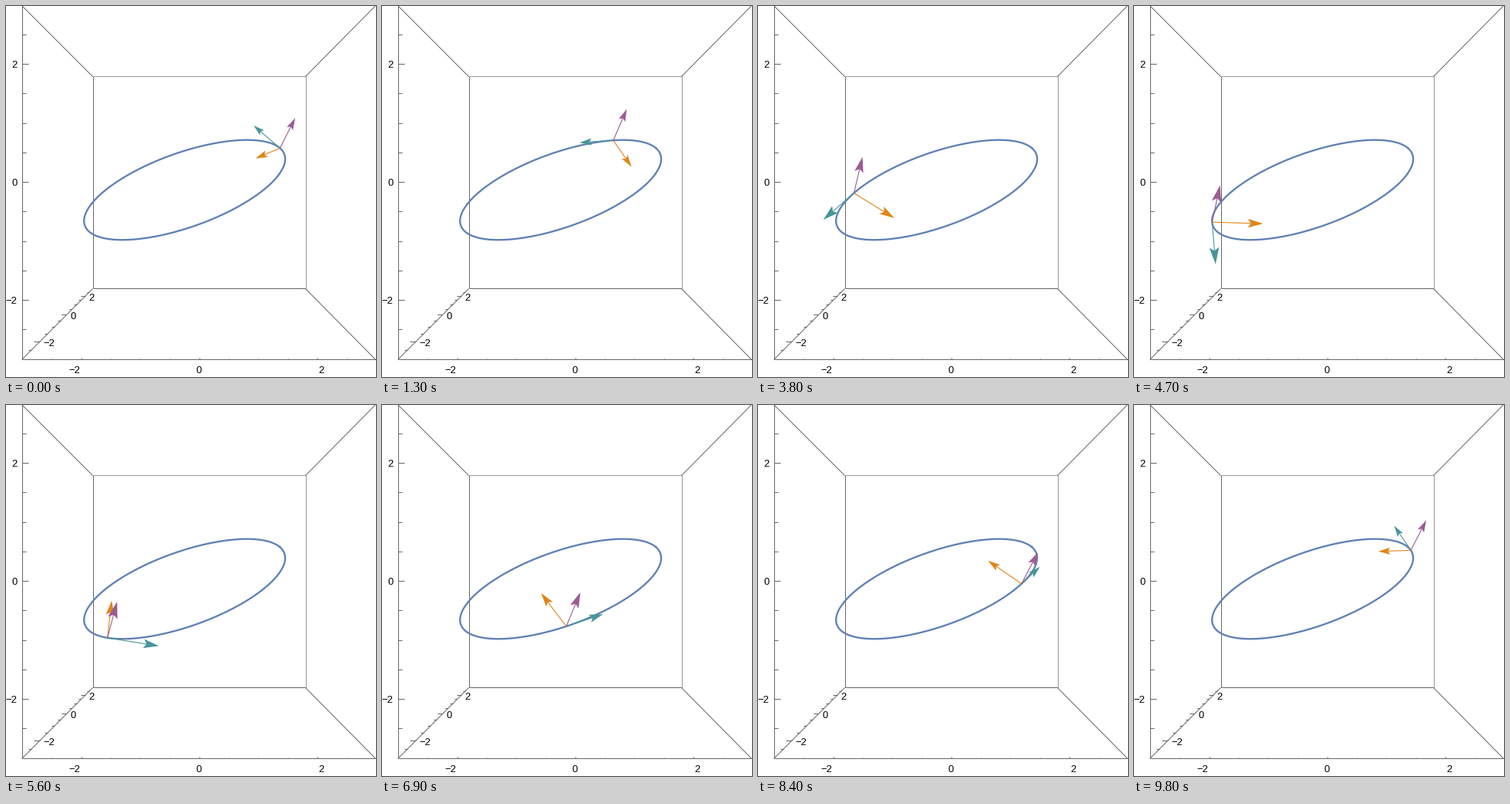
A matplotlib script that plays this animation: 480 px wide and 481 px high, repeating every 9.9 s.

```python
import numpy as np
import matplotlib.pyplot as plt
from matplotlib.animation import FuncAnimation
from matplotlib.patches import Polygon

W, H, DPI = 480, 481, 100
PX = 72 / DPI                      # one pixel in points
CENTER = np.array([250.4, 228.7])
EYE, FOCAL = 12, 688.5             # camera distance and focal length
STEPS = 100                        # steps in a full turn
FRAMES = 99

CURVE = "#5e81b5"
TEAL, ORANGE, PURPLE = "#47959b", "#e08519", "#9a5c92"
GREY = "#666666"

# Orthonormal frame of the tilted ellipse
major = np.array([0.708, 0.640, 0.2994])
major /= np.linalg.norm(major)
minor = np.array([-0.648, 0.418, 0.637])
minor -= major * (minor @ major)
minor /= np.linalg.norm(minor)
normal = np.cross(major, minor)


def scale(p):
    return FOCAL / (EYE + p[..., 1])


def project(p):
    p = np.asarray(p, float)
    s = scale(p)
    return np.stack([CENTER[0] + s * p[..., 0],
                     CENTER[1] - s * p[..., 2]], axis=-1)


def ellipse(t):
    t = np.asarray(t)[..., None]
    return 3 * np.cos(t) * major + np.sin(t) * minor


def frenet(t):
    tangent = -3 * np.sin(t) * major + np.cos(t) * minor
    tangent /= np.linalg.norm(tangent)
    return tangent, np.cross(normal, tangent), normal


# The small surplus keeps the pixel size from being rounded down
fig = plt.figure(figsize=((W + 1e-4) / DPI, (H + 1e-4) / DPI), dpi=DPI,
                 facecolor="white")
ax = fig.add_axes([0, 0, 1, 1])
ax.set_xlim(0, W)
ax.set_ylim(H, 0)
ax.axis("off")


def line(a, b, width=1.0, color=GREY):
    ax.plot([a[0], b[0]], [a[1], b[1]], color=color, lw=width * PX,
            solid_capstyle="butt", zorder=1)


def label(x, y, value, align="center"):
    ax.text(x, y, str(value).replace("-", "\u2212"), family="Liberation Sans",
            fontsize=13 * PX, color="black", ha=align, va="center_baseline",
            zorder=1)


def snap(p):
    return np.floor(p) + 0.5


def draw_box():
    def corner(x, y, z):
        return snap(project([x, y, z]))

    for y in (-3, 3):
        light = "#999999" if y == 3 else GREY
        line(corner(-3, y, -3), corner(-3, y, 3))
        line(corner(-3, y, -3), corner(3, y, -3))
        line(corner(3, y, -3), corner(3, y, 3), color=light)
        line(corner(-3, y, 3), corner(3, y, 3), color=light)
    for x in (-3, 3):
        for z in (-3, 3):
            line(corner(x, -3, z), corner(x, 3, z))


def draw_ticks():
    for v in np.arange(-2.5, 2.6, 0.5):
        big = v % 2 == 0
        x, y = snap(project([-3, -3, v]))
        line((x, y), (x + (8 if big else 5), y))
        x, y = snap(project([v, -3, -3]))
        line((x, y), (x, y - (2.5 if big else 1.8)))
        depth = np.array([-3, v, -3])
        x, y = project(depth)
        size = (0.11 if big else 0.06) * scale(depth)
        line((x - size, snap(y)), (x, snap(y)))

    for v, x, dx, dy in ((-2, 89, 48.5, 436), (0, 250, 83, 401),
                         (2, 408.5, 107, 377)):
        label(14.5, project([-3, -3, v])[1] - 0.2, v, "right")
        label(x, 471, v)
        label(dx, dy, v, "left")


class Arrow:
    HEAD, HALF, NOTCH = 0.3, 0.29, 0.8

    def __init__(self, color):
        self.shaft, = ax.plot([], [], color=color, lw=1.1 * PX,
                              solid_capstyle="butt")
        self.head = Polygon(np.zeros((4, 2)), closed=True, fc=color, ec="none")
        ax.add_patch(self.head)

    def place(self, base, vector):
        end = base + vector
        a, b = project(base), project(end)
        u = (b - a) / np.linalg.norm(b - a)
        side = np.array([-u[1], u[0]])
        size = self.HEAD * scale(end)
        notch = b - u * size * self.NOTCH
        back = b - u * size
        wing = side * size * self.HALF
        self.shaft.set_data([a[0], notch[0]], [a[1], notch[1]])
        self.head.set_xy([b, back + wing, notch, back - wing])
        order = 5 - 0.3 * end[1]   # nearer tips lie on top
        self.shaft.set_zorder(order)
        self.head.set_zorder(order + 0.01)
        return self.shaft, self.head


draw_box()
draw_ticks()
path = project(ellipse(np.linspace(0, 2 * np.pi, 400)))
ax.plot(path[:, 0], path[:, 1], color=CURVE, lw=2.3 * PX, zorder=2)
arrows = [Arrow(c) for c in (TEAL, ORANGE, PURPLE)]


def update(i):
    t = 2 * np.pi * i / STEPS
    base = ellipse(t)
    return [part for arrow, vector in zip(arrows, frenet(t))
            for part in arrow.place(base, vector)]


anim = FuncAnimation(fig, update, frames=FRAMES, interval=100,
                     repeat=True, repeat_delay=0, blit=False)
plt.show()
```
